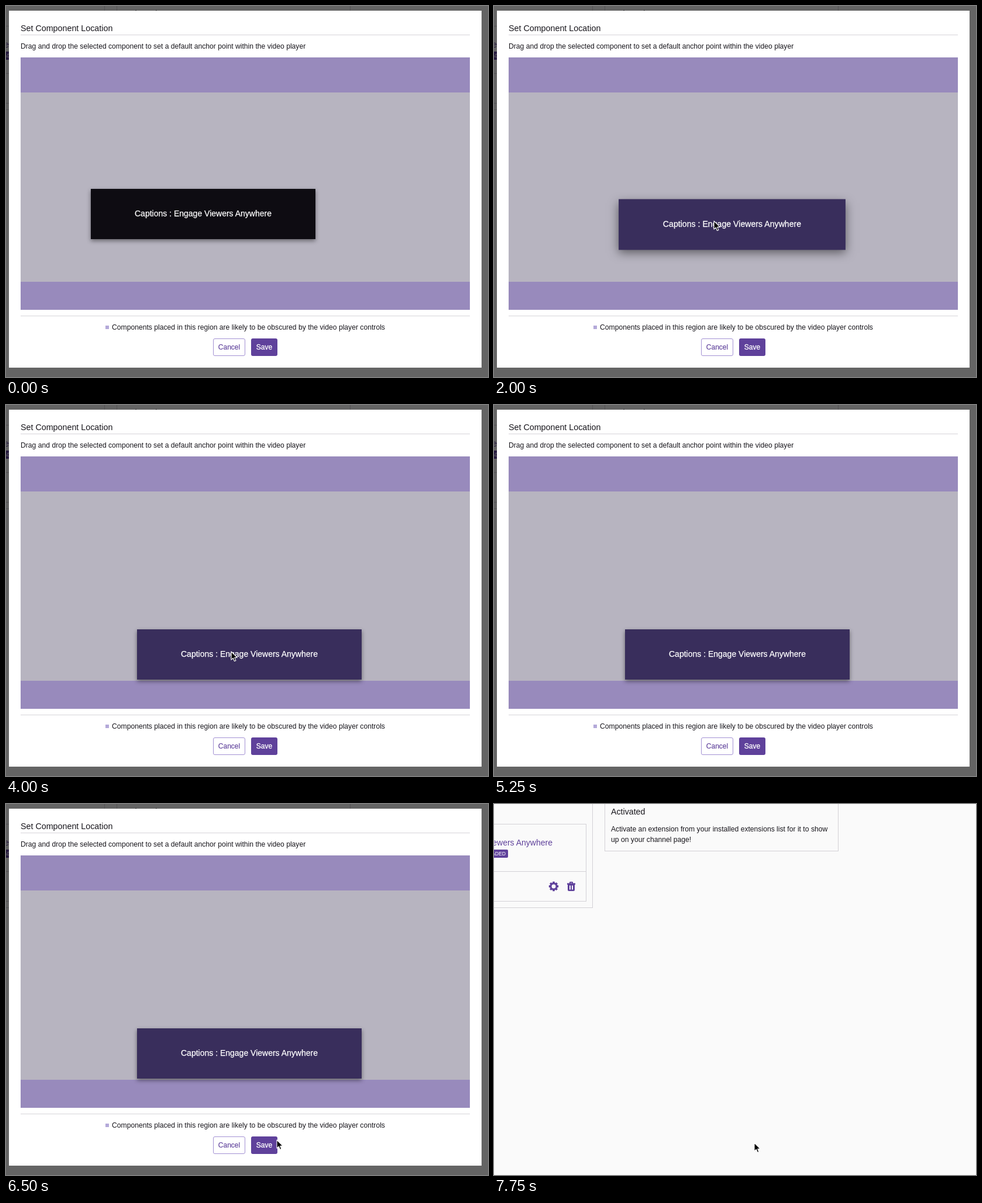
Recreate the animation shown at these times as an HTML page. Size 824 px wide and 635 px high, loop 8000 ms.

```html
<!DOCTYPE html>
<html lang="en">
<head>
<meta charset="utf-8">
<title>Set Component Location</title>
<style>
html, body { margin: 0; width: 100%; height: 100%; overflow: hidden; }
body { font: 12.17px/20px "Liberation Sans", Arial, sans-serif; color: #18161c; background: #fafafa; }
#stage { position: relative; width: 824px; height: 635px; overflow: hidden; background: #fafafa; }
#stage * { position: absolute; box-sizing: border-box; white-space: nowrap; }
.layer { left: 0; top: 0; width: 824px; height: 635px; }

/* every change is a hard cut on a quarter-second beat */
.page, .modal, .shade, .box, .save, .cursor { animation: 8s step-end infinite; }

/* page behind the dialog */
.page { animation-name: page-scroll; --purple: #5f419b; }
.frame { border: 1px solid #d3d1d6; }
.tab { left: -40px; top: -64px; width: 99px; height: 36px; border-bottom: 1px solid #d3d1d6; }
.tab b { right: 0; top: 10px; font-weight: normal; font-size: 16px; color: var(--purple); }
.name { right: 724px; top: 56px; font-size: 14px; color: var(--purple); }
.tag { right: 800px; top: 78px; height: 14px; padding: 0 4px; border-radius: 2px;
  font-size: 8.6px; line-height: 14px; color: #fff; background: var(--purple); }
.icon { fill: var(--purple); }

/* dialog */
.shade { background: rgba(0, 0, 0, .6); animation-name: close; }
.modal { animation-name: modal; }
.sheet { left: 5px; top: 8px; width: 808px; height: 611px; background: #fff; }
.rule { left: 25px; width: 768px; height: 1px; background: #d6d4d9; }
.video { left: 25px; top: 88px; width: 768px; height: 432px; background: #b7b4c0;
  border: solid #988abc; border-width: 60px 0 48px; }
.key { left: 170px; top: 547px; width: 6px; height: 6px; background: #b4a9d9; }
.btn { top: 569px; height: 30px; border-radius: 3px; text-align: center; line-height: 30px; font-size: 12px; }
.cancel { left: 354px; width: 55px; border: 1px solid #a391d3; line-height: 28px; color: #5f419b;
  -webkit-text-stroke: .15px; }
.save { left: 419px; width: 45px; color: #fff; background: #5f419b; -webkit-text-stroke: .3px;
  animation-name: save; }
.box { left: 0; top: 0; width: 384px; height: 86px; text-align: center; line-height: 85px; font-size: 14px;
  color: #fff; -webkit-text-stroke: .25px;
  --rest: 0 3px 7px rgba(0, 0, 0, .45); --lift: 0 6px 16px rgba(0, 0, 0, .5);
  animation-name: box; }
.cursor { left: 0; top: 0; animation-name: cursor; }

@keyframes page-scroll {
  0%, 78.125%, 100% { transform: none; }
  75% { transform: translateY(44px); }
}
@keyframes modal {
  0%, 78.125% { transform: none; visibility: visible; }
  75% { transform: translateY(22px); visibility: visible; }
  93.75%, 100% { transform: none; visibility: hidden; }
}
@keyframes close {
  0% { visibility: visible; }
  93.75%, 100% { visibility: hidden; }
}
@keyframes save {
  0% { background: #5f419b; box-shadow: none; }
  84.375% { background: #7d5bbe; box-shadow: none; }
  90.625%, 100% { background: #7d5bbe; box-shadow: 0 0 5px #7d5bbe; }
}
@keyframes box {
  0% { transform: translate(145px, 313px); background: #0e0c12; box-shadow: var(--rest); }
  9.375% { transform: translate(145px, 313px); background: #261f3b; box-shadow: var(--rest); }
  12.5% { transform: translate(145px, 313px); background: #392e5c; box-shadow: var(--rest); }
  21.875% { transform: translate(188px, 313px) scale(1.01); background: #392e5c; box-shadow: var(--lift); }
  25% { transform: translate(215px, 331px) scale(1.01); background: #392e5c; box-shadow: var(--lift); }
  28.125% { transform: translate(220px, 366px) scale(1.01); background: #392e5c; box-shadow: var(--lift); }
  31.25% { transform: translate(223px, 381px) scale(1.01); background: #392e5c; box-shadow: var(--lift); }
  34.375% { transform: translate(225px, 384px) scale(1.01); background: #392e5c; box-shadow: var(--lift); }
  37.5% { transform: translate(224px, 384px) scale(1.01); background: #392e5c; box-shadow: var(--lift); }
  46.875% { transform: translate(224px, 384px) scale(1.004); background: #392e5c; box-shadow: 0 4px 12px rgba(0, 0, 0, .45); }
  50% { transform: translate(224px, 384px); background: #392e5c; box-shadow: var(--rest); }
  90.625%, 100% { transform: translate(224px, 384px); background: #191624; box-shadow: var(--rest); }
}
@keyframes cursor {
  0% { transform: translate(363px, 442px); opacity: 0; }
  3.125% { transform: translate(363px, 442px); opacity: 1; }
  6.25% { transform: translate(341px, 372px); opacity: 1; }
  9.375% { transform: translate(326px, 350px); opacity: 1; }
  12.5% { transform: translate(319px, 341px); opacity: 1; }
  15.625% { transform: translate(327px, 331px); opacity: 1; }
  18.75% { transform: translate(304px, 348px); opacity: 1; }
  21.875% { transform: translate(348px, 349px); opacity: 1; }
  25% { transform: translate(375px, 367px); opacity: 1; }
  28.125% { transform: translate(380px, 403px); opacity: 1; }
  31.25% { transform: translate(383px, 418px); opacity: 1; }
  34.375% { transform: translate(385px, 421px); opacity: 1; }
  37.5% { transform: translate(384px, 421px); opacity: 1; }
  65.625% { transform: translate(384px, 421px); opacity: 0; }
  75% { transform: translate(542px, 436px); opacity: 1; }
  78.125% { transform: translate(499px, 550px); opacity: 1; }
  81.25% { transform: translate(462px, 574px); opacity: 1; }
  84.375% { transform: translate(442px, 581px); opacity: 1; }
  87.5% { transform: translate(439px, 585px); opacity: 1; }
  96.875%, 100% { transform: translate(444px, 579px); opacity: 1; }
}
</style>
</head>
<body>
<div id="stage">
  <div class="page layer">
    <div class="tab"><b>Invite Only</b></div>
    <div class="frame" style="left:-300px;top:-10px;width:469px;height:188px"></div>
    <div class="frame" style="left:-290px;top:34px;width:448px;height:133px"></div>
    <div class="frame" style="left:-290px;top:115px;width:448px;height:1px;border-width:1px 0 0"></div>
    <div class="name">Captions : Engage Viewers Anywhere</div>
    <div class="tag">UPLOADED</div>
    <svg class="icon" style="left:93px;top:132px" width="18" height="18" viewBox="-9 -9 18 18">
      <defs><rect id="cog" x="-1.9" y="-8.2" width="3.8" height="16.4" rx=".8"/></defs>
      <use href="#cog"/><use href="#cog" transform="rotate(45)"/>
      <use href="#cog" transform="rotate(90)"/><use href="#cog" transform="rotate(135)"/>
      <circle r="6.4"/><circle r="3.5" fill="#fafafa"/>
    </svg>
    <svg class="icon" style="left:125px;top:133px" width="14" height="17" viewBox="0 0 14 17">
      <path fill-rule="evenodd" d="M4 2.6V1.2Q4 0 5.200 0H8.800Q10 0 10 1.200V2.600H14V5H0V2.600ZM5.800 1.700V2.600H8.200V1.700Z"/>
      <path fill-rule="evenodd" d="M1 5H13V14Q13 16 11 16H3Q1 16 1 14ZM4 6.500V13.500H6V6.500ZM8 6.500V13.500H10V6.500Z"/>
    </svg>
    <div class="frame" style="left:189px;top:-10px;width:400px;height:91px"></div>
    <div style="left:200px;top:3px;font-size:14.2px">Activated</div>
    <div style="left:200px;top:34px;line-height:18px">Activate an extension from your installed extensions list for it to show<br style="position:static">up on your channel page!</div>
  </div>

  <div class="shade layer"></div>

  <div class="modal layer">
    <div class="sheet"></div>
    <div style="left:25px;top:28px;font-size:14.3px">Set Component Location</div>
    <div class="rule" style="top:49px"></div>
    <div style="left:25px;top:59px">Drag and drop the selected component to set a default anchor point within the video player</div>
    <div class="video"></div>
    <div class="rule" style="top:530px"></div>
    <div class="key"></div>
    <div style="left:181px;top:540px">Components placed in this region are likely to be obscured by the video player controls</div>
    <div class="btn cancel">Cancel</div>
    <div class="btn save">Save</div>
    <div class="box">Captions : Engage Viewers Anywhere</div>
  </div>

  <svg class="cursor" width="13" height="19" viewBox="0 0 13 19">
    <path d="M1 1V15.200L4.300 12.200L6.500 17.500L8.900 16.500L6.700 11.400H11.300Z" stroke="#fff" stroke-width="1.1" stroke-linejoin="round"/>
  </svg>
</div>
</body>
</html>
```
